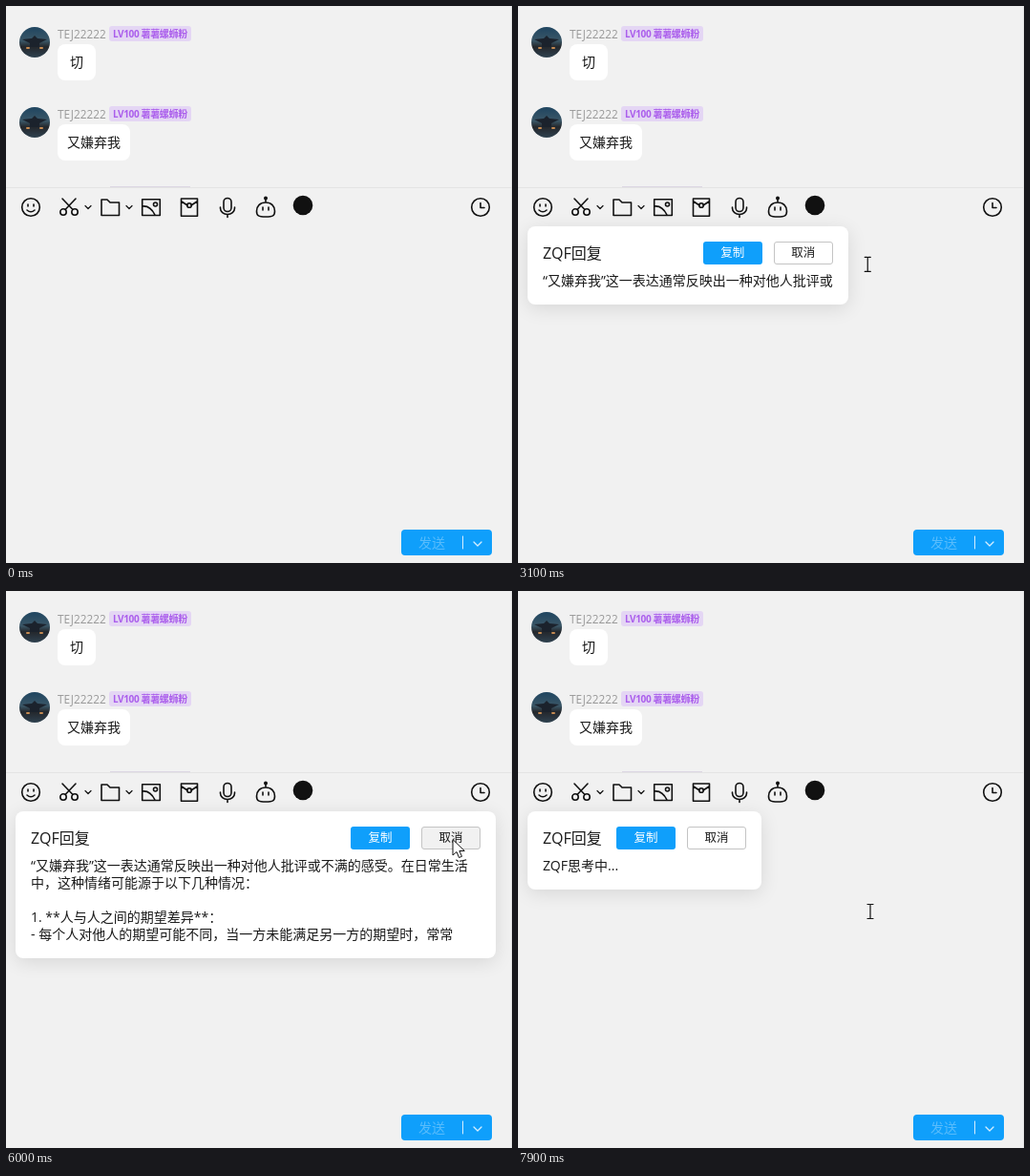
Write an HTML page that moves like this. It is 530 px wide and 584 px high and loops after 8 s.

```html
<!DOCTYPE html>
<html lang="zh-CN">
<head>
<meta charset="utf-8">
<style>
html, body { margin: 0; width: 100%; height: 100%; overflow: hidden; }
body { position: relative; background: #f1f1f1; color: #1a1a1a; font: 14px/18px "Open Sans", "Noto Sans CJK SC", "Noto Sans CJK", sans-serif; }
div, svg { position: absolute; box-sizing: border-box; white-space: pre; }
svg { left: 0; top: 0; overflow: visible; fill: none; stroke: #111; stroke-linecap: round; stroke-linejoin: round; }
.msg { left: 0; }
.user { left: 54px; top: 20px; font-size: 11.8px; color: #999; }
.badge { left: 108px; top: 21px; width: 86px; height: 16px; border-radius: 3px; background: #e4d6f4; color: #ab5eec; font: bold 10px/16px "Open Sans", "Noto Sans CJK SC", "Noto Sans CJK", sans-serif; letter-spacing: -.35px; padding-left: 4px; }
.bubble { left: 54px; top: 40px; height: 38px; line-height: 38px; border-radius: 8px; background: #fff; text-align: center; }
.send { left: 414px; top: 549px; width: 95px; height: 27px; border-radius: 4px; background: #0f9ffb; color: #58bcfc; line-height: 27px; padding-left: 18px; }
#dialog { left: 10px; top: 231px; min-width: 245px; max-width: 503px; width: max-content; padding: 48px 16px 16px; border-radius: 8px; background: #fff; box-shadow: 0 4px 20px rgba(0,0,0,.11); }
#dialog b { font-weight: 400; font-size: 16px; position: absolute; left: 16px; top: 19px; }
#reply { position: static; white-space: pre-wrap; min-height: 18px; }
.btn { top: 16px; width: 62px; height: 24px; border-radius: 3px; font-size: 12.5px; line-height: 24px; text-align: center; }
#copy { right: 90px; background: #0f9ffb; color: #fff; }
#cancel { right: 16px; border: 1px solid #c4c4c4; line-height: 22px; }
.panel { background: #fff; border-radius: 3px; box-shadow: 0 1px 6px rgba(0,0,0,.06); }
#menu { width: 145px; height: 382px; }
#list { inset: 0; border-radius: 8px; background: rgba(253,253,253,.94); backdrop-filter: blur(5px); box-shadow: 0 4px 16px rgba(0,0,0,.18); }
.item { left: 5px; width: 136px; height: 28px; border-radius: 4px; line-height: 28px; padding-left: 31px; }
</style>
</head>
<body>
<div style="left:529px;top:0;width:1px;height:584px;background:#e7e7e7"></div>
<div style="left:109px;top:189px;width:84px;height:1px;background:#dcd6e2"></div>
<div style="left:0;top:190px;width:530px;height:1px;background:#e4e4e4"></div>
<div id="chat"></div>
<svg width="530" height="584" stroke-width="1.6">
  <g transform="translate(26 211)"><circle r="9.3"/><path d="M-3-3v2M3-3v2M-4 3q4 3.500 8 0"/></g>
  <g transform="translate(66 211)"><circle cx="-6" cy="5" r="3.200"/><circle cx="6" cy="5" r="3.200"/><path d="M-4 2.500L7-9M4 2.500L-7-9"/></g>
  <path stroke-width="1.200" d="M83 209.500l3 3 3-3M126 209.500l3 3 3-3"/>
  <path d="M100 203h6l3 3h9.500v13.500h-18.500z"/>
  <g transform="translate(152 211)"><path d="M-9.300-8.300h18.600v16.800h-18.600zM-9-1q8-1 13 9"/><circle cx="4.500" cy="-3" r="2"/></g>
  <g transform="translate(192 211)"><path d="M-8.500-9h17v18.300h-17zM-8-6l6 4M8-6l-6 4"/><circle cy="-2" r="2.300"/></g>
  <g transform="translate(232 211)"><rect x="-4" y="-9.500" width="8" height="14" rx="4"/><path d="M-7.500 0v1a7.500 6.500 0 0 0 15 0v-1M0 8v2.500"/></g>
  <g transform="translate(272 211)"><path d="M0-5c6 0 9.500 4 9.500 9 0 5-2 6-9.500 6s-9.500-1-9.500-6c0-5 3.500-9 9.500-9zM0-5v-4M-3 0v3M3 0v3"/><circle cy="-9.500" r="1.200" fill="#111"/></g>
  <circle cx="311" cy="209" r="10.300" fill="#111" stroke="none" style="stroke:none"/>
  <g transform="translate(497 211)"><circle r="9.300"/><path d="M0-4.500v5h4"/></g>
</svg>
<div class="send">发送<svg stroke-width="1.300" style="stroke:#d5eefe"><path d="M64.500 7v13" stroke-width="1"/><path d="M76 13l4 4 4-4"/></svg></div>

<div id="dialog"><b>ZQF回复</b><div class="btn" id="copy">复制</div><div class="btn" id="cancel">取消</div><div id="reply"></div></div>

<div id="menu">
  <div class="panel" style="left:0;top:-44px;width:242px;height:38px">
    <svg width="242" height="38" style="stroke:none">
      <path transform="translate(18 20)" fill="#fbd3a4" stroke="#eeb277" d="M-8 0l4-1q4-3 4-8 4-1 4 7h4q3 1 1 4 2 2 0 4 0 4-4 4H-4l-4-1z"/>
      <g transform="translate(53 20)" stroke="#f8cc9c" stroke-width="4"><path d="M-4 3L-7-6M0 0L-1-9M4 1L6-7"/><ellipse cx="1" cy="5" rx="5" ry="4.500" fill="#f2bd84"/></g>
      <path transform="translate(87 20)" fill="#ee2549" d="M0 10C-19 0-10-15 0-6 10-15 19 0 0 10z"/>
      <circle cx="121" cy="20" r="10.500" fill="#e6ad3e"/>
      <g transform="translate(154 20)"><circle r="10.500" fill="#fcc638"/><circle cx="-3" r="1.500" fill="#57330b"/><circle cx="4" r="1.500" fill="#57330b"/><path d="M-3 6q3-2 6 0" stroke="#57330b" stroke-width="1.300"/><path d="M-10-3L-2-6" stroke="#f0b050" stroke-width="4"/></g>
      <g transform="translate(188 20)"><circle r="10.500" fill="#fcc638"/><path d="M-6-3q2-2 4 0M2-3q2-2 4 0" stroke="#57330b" stroke-width="1.300"/><circle cy="4" r="2.500" fill="#8a4515"/><path d="M-9 9L0 4M-6 10L2 7" stroke="#f6b95a" stroke-width="4"/></g>
      <g transform="translate(223 20)" stroke="#777" stroke-width="1.300"><path d="M9-2A9.500 9.500 0 1 0 2 9.300M-3-3v1M3-3v1M-4 3q4 4 7 0M7 3v7M3.500 6.500h7"/></g>
    </svg>
  </div>
  <div id="list"></div>
</div>
<svg id="cursor" width="20" height="24">
  <path id="arrow" d="M0 0v16l4-3.500 2.500 6 3-1.200-2.600-5.800h5z" fill="#fff" stroke-width="1"/>
  <path id="beam" d="M-3-7.500h2.500M.5-7.500h2.500M0-7v14M-3 7.500h2.500M.5 7.500h2.500" stroke-width="1.200"/>
</svg>

<script>
const $ = id => document.getElementById(id);

[[0, '切', 40], [84, '又嫌弃我', 76]].forEach(([y, text, w]) => {
  $('chat').innerHTML += `<div class="msg" style="top:${y}px">
<svg width="60" height="60" style="stroke:none"><defs><linearGradient id="sky" x2="0" y2="1"><stop stop-color="#1f4560"/><stop offset=".45" stop-color="#3b5767"/><stop offset=".65" stop-color="#24272c"/><stop offset="1" stop-color="#2f4250"/></linearGradient></defs>
<circle cx="30" cy="38" r="16" fill="url(#sky)"/><path d="M17 35l10-1 3-3 3 3 10 1-8 4v4h-10v-4z" fill="#1b222c"/><path d="M22 44h2M36 44h2" stroke="#c58a52" stroke-width="2"/></svg>
<div class="user">TEJ22222</div><div class="badge">LV100 薯薯螺蛳粉</div>
<div class="bubble" style="width:${w}px">${text}</div></div>`;
});
const bubble = document.querySelectorAll('.bubble')[1];

// Menu rows: label and icon path around the row's icon centre
const bot = name => [`ZQF (${name})`];
const rows = [
  ['复制', 'M-6-3h9v9h-9zM-3-3v-3h9v9h-3'],
  ['转发', 'M-1-6h-5v12h11v-4M-2 2q0-5 7-5M3-6l3 3-3 3'],
  ['收藏', 'M-5-6h10v12l-5-3-5 3zM-1.500-1.500h3v2h-3z'],
  ['多选', 'M-6.500 0a6.500 6.500 0 1 0 13 0a6.500 6.500 0 1 0-13 0M-3 0l2 2 4-4'],
  ['引用', 'M-4 5A6.500 6.500 0 1 1 2 6l-2 1zM-3-2h2v2l-1 2M2-2h2v2l-1 2'],
  ['设为精华', 'M-6-5h12v9h-7l-3 2v-2h-2zM-2-.5h4M0-2.500v4'],
  ...['翻译官', '专业解答', '梗王', '情人', '抽象大师'].map(bot),
  ['撤回', 'M-3-6l-3 3 3 3M-6-3h7q5 0 5 4t-5 4h-5'],
  ['删除', 'M-6-4h12M-2-4v-2h4v2M-5-4v10h10v-10M-1.500-1v4M1.500-1v4']
];
const rowTop = i => 4 + i * 28 + (i > 10 ? 9 : 0);
$('list').innerHTML = rows.map(([label, icon], i) =>
  `<div class="item" style="top:${rowTop(i)}px"><svg width="30" height="28" stroke-width="1.200"><g transform="translate(15 14)">${
    icon ? `<path d="${icon}"/>` : '<circle r="7.500" fill="#111" stroke="none"/>'}</g></svg>${label}</div>`
).join('') + '<div style="left:12px;top:316px;width:122px;height:1px;background:#ececec"></div>';
const items = [...document.querySelectorAll('.item')];

const answer = '“又嫌弃我”这一表达通常反映出一种对他人批评或不满的感受。在日常生活中，这种情绪可能源于以下几种情况：\n\n1. **人与人之间的期望差异**：\n- 每个人对他人的期望可能不同，当一方未能满足另一方的期望时，常常';
const path = [
  [0, 420, 610], [400, 420, 610], [800, 107, 148], [900, 107, 148], [1400, 150, 362], [1600, 150, 362],
  [1800, 240, 350], [2000, 240, 610], [2400, 360, 610], [2800, 400, 335], [3200, 360, 259], [3300, 360, 259],
  [3600, 106, 135], [3700, 106, 135], [3800, 112.5, 150], [4300, 165, 350], [4500, 165, 350], [5000, 428, 323],
  [5400, 440, 318], [5900, 468, 261], [6100, 468, 261], [6500, 98, 148], [6700, 98, 148], [7200, 150, 370],
  [7400, 150, 370], [7900, 369, 336], [8000, 369, 336]
];
const menus = [[900, 1500, 107, 148], [3700, 4500, 106, 135], [6700, 7400, 98, 148]];
const dialogs = [
  [1600, 3300, [[2800, 10], [3200, 27]]],
  [4600, 6100, [[4900, 4], [5000, 10], [5400, 33], [6000, answer.length]]],
  [7500, 8000, []]
];

const active = (list, t) => list.find(([from, to]) => t >= from && t < to);
const show = (el, on) => el.style.display = on ? '' : 'none';

// Linear or eased values between timed keys, held at the ends
function between(keys, t, ease = u => u) {
  const i = keys.findIndex(k => k[0] > t);
  if (i < 1) return keys[i < 0 ? keys.length - 1 : 0].slice(1);
  const a = keys[i - 1], b = keys[i], u = ease((t - a[0]) / (b[0] - a[0]));
  return a.slice(1).map((v, j) => v + (b[j + 1] - v) * u);
}

function inside(el, x, y) {
  const r = el.getBoundingClientRect();
  return x >= r.left && x < r.right && y >= r.top && y < r.bottom;
}

function draw() {
  const t = Math.floor(performance.now() % 8000 / 100) * 100;
  const [x, y] = between(path, t, u => u * u * (3 - 2 * u));
  const menu = active(menus, t), dialog = active(dialogs, t);

  show($('menu'), menu);
  bubble.style.background = menu ? '#e0e0e0' : '';
  if (menu) {
    $('menu').style.left = menu[2] + 'px';
    $('menu').style.top = menu[3] + 'px';
    items.forEach(el => el.style.background = inside(el, x, y) ? '#f4f4f4' : '');
  }

  show($('dialog'), dialog);
  if (dialog) {
    const keys = dialog[2];
    $('reply').textContent = keys.length && t >= keys[0][0]
      ? answer.slice(0, Math.round(between(keys, t)[0])) : 'ZQF思考中...';
    $('cancel').style.background = inside($('cancel'), x, y) ? '#f1f1f1' : '#fff';
  }

  const typing = !menu && (y > 231 ? !(dialog && inside($('dialog'), x, y)) : inside(bubble, x, y));
  show($('arrow'), !typing);
  show($('beam'), typing);
  $('cursor').style.transform = `translate(${x}px, ${y}px)`;
  requestAnimationFrame(draw);
}
draw();
</script>
</body>
</html>
```
